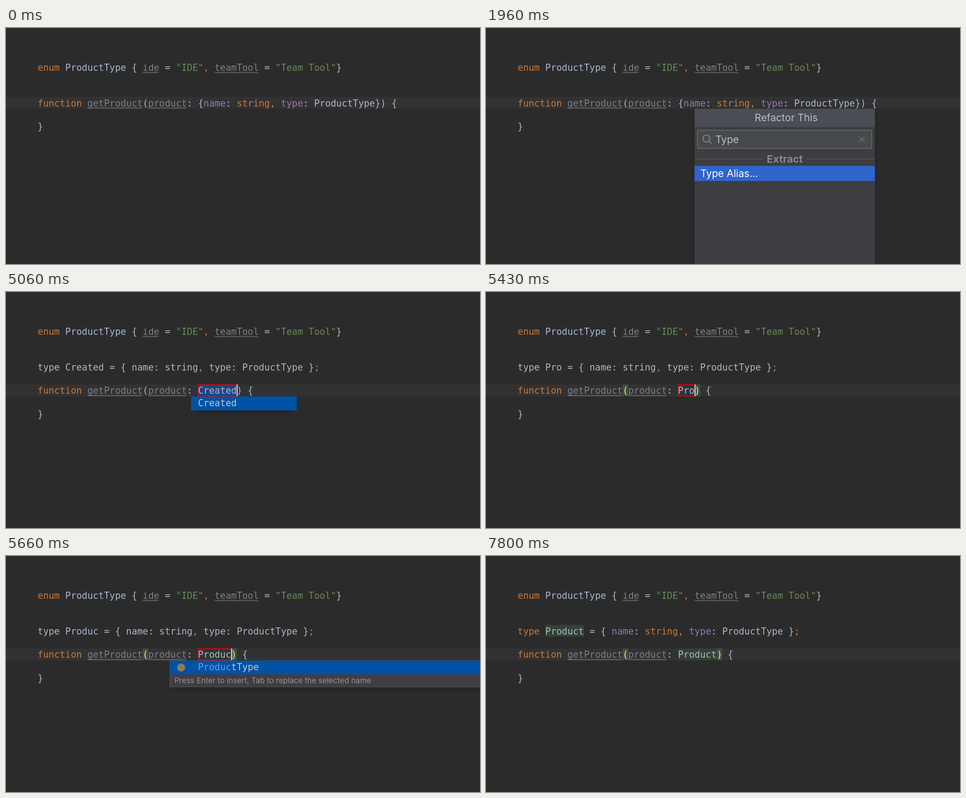
Animation, 1058 px wide and 529 px high, one loop 8000 ms. Source, as an HTML page:

```html
<!DOCTYPE html>
<html lang="en">
<head>
<meta charset="utf-8">
<title>Extract type alias</title>
<style>
  html, body { margin: 0; width: 100%; height: 100%; overflow: hidden; background: #2b2b2c; }
  svg { display: block; width: 100vw; height: 100vh; }
  text { white-space: pre; }
  .code { font: 20.5px "DejaVu Sans Mono", "Liberation Mono", monospace; }
  .ui { font: 22.4px Inter, "Open Sans", sans-serif; }
</style>
</head>
<body>
<svg id="stage" viewBox="0 0 1058 529" preserveAspectRatio="none"></svg>
<script>
const LOOP = 8000;
const LEFT = 70.6, CHAR = 12.342, ROW = 26.4;
const C = {
  plain: '#a9b7c6', key: '#cc7832', str: '#6a8759', prop: '#9876aa', dim: '#7f7f80',
  paren: '#ffef28', parenBg: '#3b514d', usage: '#344134', row: '#323234',
  caret: '#c8c8c8', select: '#214283', panel: '#3f3e43', blue: '#0052a4', match: '#589df6'
};

// Each step changes part of the state from its time on.
const START = { caret: 0, menu: 0, query: '', name: '', box: 0, sel: 0, paren: 0, look: '', types: 0, props: 0, waves: 1, usage: 0 };
const STEPS = [
  [0, {}],
  [60, { caret: 1 }],
  [500, { caret: 0 }],
  [830, { menu: 1 }],
  [1630, { query: 'T' }],
  [1730, { query: 'Ty' }],
  [1900, { query: 'Typ' }],
  [1960, { query: 'Type' }],
  [3930, { menu: 0 }],
  [4300, { name: 'Created', box: 1, sel: 1, caret: 1 }],
  [4330, { look: 'name' }],
  [4660, { caret: 0 }],
  [5060, { caret: 1 }],
  [5100, { name: 'P', sel: 0, look: '', paren: 1 }],
  [5230, { name: 'Pr' }],
  [5330, { name: 'Pro' }],
  [5460, { name: 'Prod' }],
  [5500, { look: 'blank' }],
  [5530, { look: 'many' }],
  [5590, { name: 'Produ' }],
  [5630, { look: 'one' }],
  [5660, { name: 'Produc' }],
  [5800, { name: 'Product' }],
  [6230, { caret: 0 }],
  [6560, { look: '' }],
  [6630, { box: 0, caret: 1 }],
  [6830, { types: 1 }],
  [6870, { props: 1, waves: 0 }],
  [6920, { waves: 1 }],
  [6960, { usage: 1 }],
  [7100, { usage: 2 }],
  [7800, { caret: 0 }]
];
let last = START;
const TIMELINE = STEPS.map(([at, change]) => ({ at, state: last = { ...last, ...change } }));

const colX = col => LEFT + col * CHAR;
const rect = (x, y, w, h, fill, more = '') =>
  `<rect x="${x}" y="${y}" width="${w}" height="${h}" fill="${fill}" ${more}/>`;
const line = (x1, y1, x2, y2, color, width) =>
  `<path d="M${x1} ${y1}L${x2} ${y2}" stroke="${color}" stroke-width="${width}" fill="none"/>`;
const label = (kind, x, y, fill, str, more = '') =>
  `<text class="${kind}" x="${x}" y="${y}" fill="${fill}" ${more}>${str}</text>`;

function wave(x, y, width) {
  let d = `M${x} ${y + 1.5}`;
  for (let i = 1; i * 2.5 <= width; i++) d += `L${x + i * 2.5} ${y + (i % 2 ? -1.2 : 1.5)}`;
  return `<path d="${d}" stroke="#77777a" stroke-width="1.1" fill="none"/>`;
}

// Tokens are [text, color, style]; style is any of i(talic), w(avy), b(old).
function codeLine(y, tokens) {
  let col = 0, out = '';
  for (const [str, color = 'plain', style = ''] of tokens) {
    const more = (style.includes('i') ? 'font-style="italic" ' : '') + (style.includes('b') ? 'font-weight="700"' : '');
    out += label('code', colX(col), y, C[color], str, more);
    if (style.includes('w')) out += wave(colX(col), y + 3.7, str.length * CHAR);
    col += str.length;
  }
  return out;
}

function shade(x, y, w, h) {
  return rect(x, y, w, h, '#1d1e1c', 'opacity=".45" filter="url(#soft)"');
}

function code(s) {
  const named = s.name !== '';
  const top = named ? 207.2 : 154.4;
  const nameW = s.name.length * CHAR;
  const wavy = s.waves ? 'w' : '';
  let out = rect(0, top, 1058, ROW, C.row);

  if (s.usage > 0) out += rect(colX(5), 154.4, nameW, ROW, C.usage);
  if (s.usage > 1) out += rect(colX(29), top, nameW, ROW, C.usage);
  if (s.sel) out += rect(colX(29), top, nameW, ROW, C.select);
  if (s.paren) out += rect(colX(19), top, CHAR, ROW, C.parenBg) +
    rect(colX(29) + nameW, top, CHAR, ROW, C.parenBg);

  out += codeLine(96, [
    ['enum ', 'key'], ['ProductType { '], ['ide', 'dim', 'iw'], [' = '], ['"IDE"', 'str'], [', ', 'key'],
    ['teamTool', 'dim', 'iw'], [' = '], ['"Team Tool"', 'str'], ['}']
  ]);
  const head = [['function ', 'key'], ['getProduct', 'dim', wavy]];
  const arg = ['product', 'dim', wavy];
  if (named) {
    const type = s.types ? 'key' : 'plain', prop = s.props ? 'prop' : 'plain';
    const mark = s.paren ? ['paren', 'b'] : [];
    out += codeLine(175.6, [
      ['type ', type], [s.name + ' = { '], ['name', prop], [': '], ['string', type], [', ', 'key'],
      ['type', prop], [': ProductType }'], [';', 'key']
    ]);
    out += codeLine(228.4, [...head, ['(', ...mark], arg, [': ' + s.name], [')', ...mark], [' {']]);
    out += codeLine(280.6, [['}']]);
  } else {
    out += codeLine(175.6, [
      ...head, ['('], arg, [': {'], ['name', 'prop'], [': '], ['string, ', 'key'], ['type', 'prop'], [': ProductType}) {']
    ]);
    out += codeLine(227.8, [['}']]);
  }

  if (s.box) out += rect(colX(29) + .4, 208, nameW, 25, 'none', 'stroke="#dd0808" stroke-width="1.8"');
  if (s.caret) out += rect(colX(named ? 29 + s.name.length : 32) - .3, top, 2.6, ROW, C.caret);
  return out;
}

function separator(y, title, half) {
  return line(466, y, 667 - half, y, '#56565a', 1.5) + line(667 + half, y, 868, y, '#56565a', 1.5) +
    label('ui', 667, y + 8, '#87888b', title, 'text-anchor="middle" style="font-size:23px;font-weight:700"');
}

function menuItem(y, str, selected) {
  return (selected ? rect(465.5, y, 402.5, 34, '#2f65ca') : '') +
    label('ui', 478.5, y + 25, selected ? '#fff' : '#bbbcbe', str);
}

function menu(s) {
  let out = shade(464, 184, 404, 360) + rect(465.5, 181, 402.5, 360, '#3e3d42') +
    rect(465.5, 181, 402.5, 41, '#4a4d54') +
    label('ui', 670, 209, '#bdbec0', 'Refactor This', 'text-anchor="middle"');
  if (!s.query) {
    out += menuItem(225, 'Rename...', true) + menuItem(259, 'Change Signature...') + separator(308, 'Extract', 48);
    ['Variable...', 'Constant...', 'Parameter...', 'Function...', 'Type Alias...', 'Interface...']
      .forEach((str, i) => out += menuItem(322 + i * 34, str));
    return out;
  }
  return out + rect(471.8, 229.2, 389.4, 40.6, '#454a4b', 'rx="2.5" stroke="#66696b" stroke-width="1.8"') +
    '<circle cx="492" cy="247.8" r="7.8" fill="none" stroke="#8d9092" stroke-width="1.7"/>' +
    line(497.6, 253.4, 503.4, 259.2, '#8d9092', 1.8) +
    line(833, 243.6, 845.4, 256, '#707375', 1.5) + line(845.4, 243.6, 833, 256, '#707375', 1.5) +
    label('ui', 512, 258, '#bdbec0', s.query) +
    separator(294.3, 'Extract', 48) + menuItem(309, 'Type Alias...', true);
}

function lookup(s) {
  if (s.look === 'name') return shade(424, 258, 214, 14) +
    rect(412.8, 234, 236.2, 31.4, C.blue) + label('code', colX(29), 256.4, '#bcc5d0', s.name);

  const rows = {
    blank: [],
    one: ['ProductType'],
    many: ['ProductType', 'PropertyDecorator', 'PropertyDescriptor', 'PropertyDescriptorMap', 'ParameterDecorator', 'PromiseConstructor']
  }[s.look];
  const h = s.look === 'one' ? 60 : 218;
  let out = shade(376, 244, 700, h - 18 + 14) + rect(365, 234, 700, h, '#434347') +
    rect(371, 236, 700, h - 2, C.panel) +
    rect(365.5, 234.5, 700, h - 1, 'none', 'stroke="#505154"');
  rows.forEach((word, i) => {
    const y = 234.5 + i * 31;
    const cut = i ? 3 : s.name.length;
    if (!i) out += rect(365, y, 693, 30.5, C.blue);
    out += `<circle cx="391" cy="${y + 15.5}" r="9" fill="#8c7a55"/>` +
      label('code', colX(29), y + 21.9, '#bcc5d0', `<tspan fill="${C.match}">${word.slice(0, cut)}</tspan>${word.slice(cut)}`);
  });
  if (rows.length) out += label('ui', 376, 234 + h - 9, '#929396',
    'Press Enter to insert, Tab to replace the selected name', 'style="font-size:17px"');
  return out;
}

const DEFS = '<defs><filter id="soft" x="-10%" y="-30%" width="120%" height="160%"><feGaussianBlur stdDeviation="3"/></filter></defs>';
const stage = document.getElementById('stage');
let shown = null;

function draw(now) {
  const t = now % LOOP;
  const { state } = TIMELINE.findLast(step => step.at <= t);
  if (state !== shown) {
    shown = state;
    stage.innerHTML = DEFS + rect(0, 0, 1058, 529, '#2b2b2c') + code(state) +
      (state.menu ? menu(state) : '') + (state.look ? lookup(state) : '');
  }
}

const begun = performance.now();
function tick() {
  draw(performance.now() - begun);
  requestAnimationFrame(tick);
}
tick();
</script>
</body>
</html>
```
